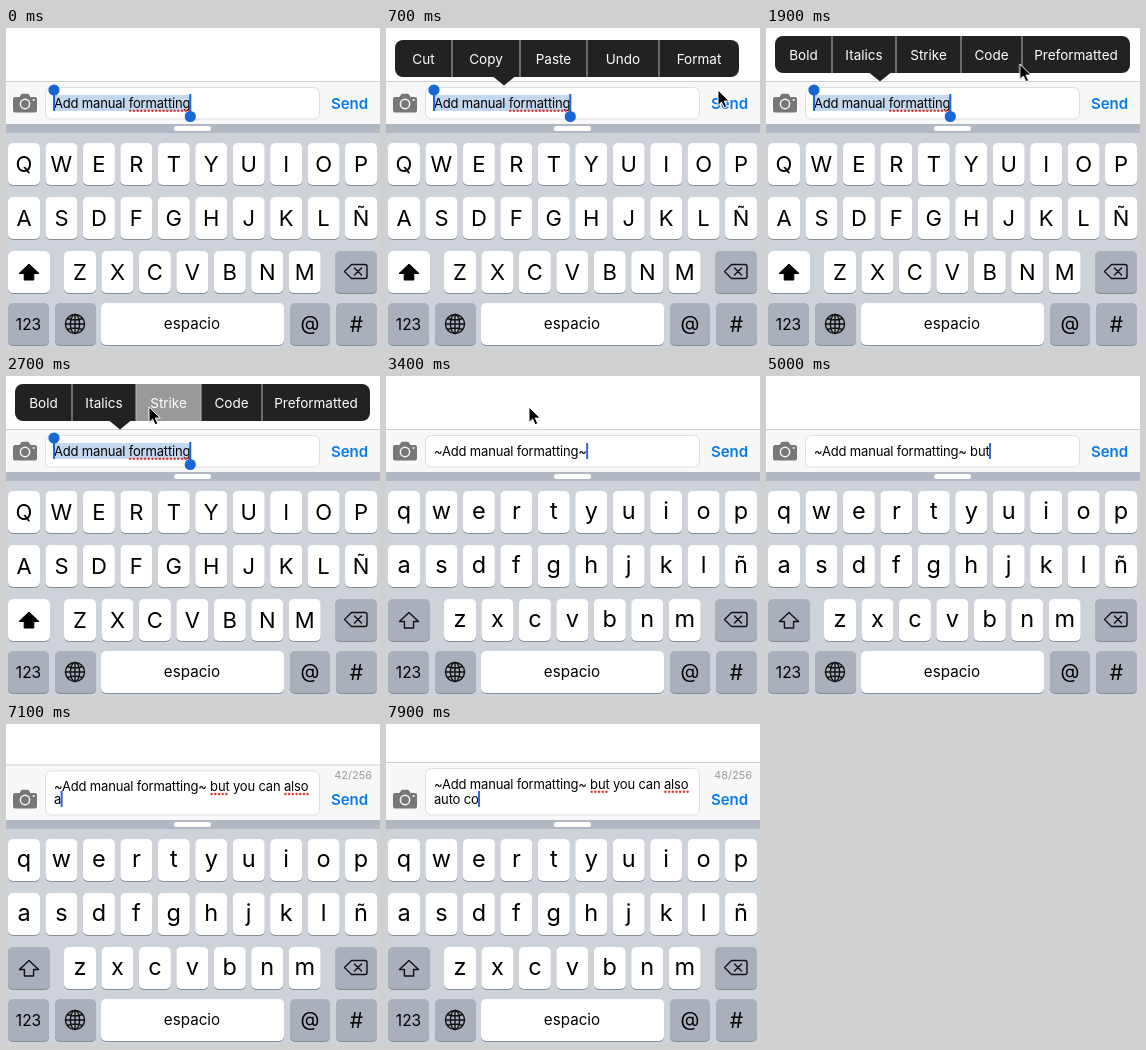
An HTML page for the animation above (8000 ms loop, 374 by 320 pixels).

```html
<!DOCTYPE html>
<html lang="en">
<head>
<meta charset="utf-8">
<title>Message formatting</title>
<style>
  html, body { margin: 0; width: 100%; height: 100%; overflow: hidden; background: #fff; }
  svg { display: block; width: 374px; height: 320px; font-family: Inter, Roboto, sans-serif; }
  text { white-space: pre; }
  .mid { text-anchor: middle; }
  .msg { font-size: 13px; letter-spacing: -.18px; }
  .upper { font-size: 22px; }
  .lower { font-size: 23.5px; }
  .label { font-size: 13.5px; fill: #fff; text-anchor: middle; }
  .typo { stroke: #e03a34; stroke-width: 2.5; stroke-linecap: round; stroke-dasharray: 0 3.7; }
  .line { fill: none; stroke: #111; stroke-width: 1.4; stroke-linejoin: round; stroke-linecap: round; }

  .before, .after, .menu, .press { animation: 8s step-end infinite; }
  .before { animation-name: before; }
  .after { animation-name: after; }
  #menu1 { animation-name: menu1; }
  #menu2 { animation-name: menu2; }
  #menu1 .press { animation-name: press1; }
  #menu2 .press { animation-name: press2; }
  #mouse { animation: show 8s step-end infinite, move 8s ease-in-out infinite; }

  @keyframes before { 0% { visibility: visible } 36.25%, 100% { visibility: hidden } }
  @keyframes after { 0% { visibility: hidden } 36.25%, 100% { visibility: visible } }
  @keyframes menu1 { 0% { visibility: hidden } 3.75% { visibility: visible } 18.75%, 100% { visibility: hidden } }
  @keyframes menu2 { 0% { visibility: hidden } 18.75% { visibility: visible } 36.25%, 100% { visibility: hidden } }
  @keyframes press1 { 0% { opacity: 0 } 16.9% { opacity: 1 } 18.75%, 100% { opacity: 0 } }
  @keyframes press2 { 0% { opacity: 0 } 31.25% { opacity: 1 } 36.25%, 100% { opacity: 0 } }
  @keyframes show { 0% { visibility: hidden } 8.75% { visibility: visible } 46.9%, 100% { visibility: hidden } }
  @keyframes move {
    0%, 8.75% { transform: translate(332px, 62px) }
    13.75%, 20% { transform: translate(300px, 38px) }
    30%, 100% { transform: translate(143px, 31px) }
  }
</style>
</head>
<body>
<svg id="stage" viewBox="0 0 374 320">
  <rect width="374" height="320" fill="#fff"/>

  <g id="bar">
    <rect id="barBack" width="374" fill="#f8f8f9"/>
    <rect id="barEdge" width="374" height="1" fill="#cfcfd2"/>
    <rect id="field" x="39.5" width="274" rx="6" fill="#fff" stroke="#dedee0"/>
    <g fill="#77777a">
      <path d="M9 69h4.5l1.6-2.6q.4-.6 1.1-.6h5.6q.7 0 1.1.6l1.6 2.6H29q2 0 2 2v11.5q0 2-2 2H9q-2 0-2-2V71q0-2 2-2z"/>
      <circle cx="19" cy="76" r="5.4" fill="#f8f8f9"/>
      <circle cx="19" cy="76" r="3.9"/>
      <circle cx="27.6" cy="72" r="1" fill="#f8f8f9"/>
    </g>
    <text x="343.5" y="80.5" class="mid" font-size="15" font-weight="600" fill="#087ae8">Send</text>
    <text id="count" x="366" y="54.5" font-size="11" text-anchor="end" fill="#9b9ba0"></text>
  </g>

  <g class="before">
    <rect id="mark" x="48" y="67" height="16" fill="#c3d8ee"/>
    <text id="chosen" class="msg" x="48" y="80">Add manual formatting</text>
    <path id="chosenTypo" class="typo"/>
    <g fill="#1768d6">
      <rect x="47" y="62" width="2" height="21"/>
      <circle cx="48" cy="62" r="5.6"/>
      <g id="endGrip">
        <rect x="-1" y="66" width="2" height="22"/>
        <circle cy="88.5" r="5.6"/>
      </g>
    </g>
  </g>

  <g class="after">
    <text id="line1" class="msg" x="48"></text>
    <text id="line2" class="msg" x="48" y="80"></text>
    <path id="typos" class="typo"/>
    <rect id="caret" y="67" width="2" height="16" fill="#3565d8"/>
  </g>

  <rect y="96" width="374" height="224" fill="#ced2d9"/>
  <rect y="96" width="374" height="9" fill="#b2b8c3"/>
  <rect x="168" y="98" width="37" height="5" rx="2.5" fill="#fff"/>
  <g id="keys"></g>

  <g class="before">
    <rect x="2" y="223" width="42" height="42" rx="5" fill="#fff"/>
    <path d="M23 236l10 9.5h-5.2v6.5h-9.6v-6.5H13z" stroke="#000" stroke-linejoin="round"/>
  </g>
  <path class="line after" d="M23 236.5l9.6 9h-5v6.5h-9.2v-6.5h-5z"/>
  <path class="line" d="M345.5 236.5H359q2 0 2 2v10q0 2-2 2h-13.5l-7-7zM348.5 240l7 7m0-7l-7 7"/>
  <g class="line" stroke-width="1.2">
    <circle cx="69" cy="296" r="9.5"/>
    <ellipse cx="69" cy="296" rx="4.6" ry="9.5"/>
    <path d="M69 286.5v19M59.5 296h19M61.5 290.5q7.5 3 15 0M61.5 301.5q7.5-3 15 0"/>
  </g>

  <g id="menu1" class="menu"></g>
  <g id="menu2" class="menu"></g>
  <path id="mouse" d="M0 0v15.5l3.6-3.4 2.5 5.7 2.7-1.2-2.5-5.5h5z" fill="#000" stroke="#fff" stroke-width="1"/>
</svg>

<script>
const $ = id => document.getElementById(id);
const set = (node, attrs) => {
  for (const k in attrs) node.setAttribute(k, attrs[k]);
  return node;
};
const add = (parent, tag, attrs, text = '') => {
  const node = set(document.createElementNS('http://www.w3.org/2000/svg', tag), attrs);
  node.textContent = text;
  return parent.appendChild(node);
};

// Keyboard
const GREY = '#a9afbb';
function key(x, y, width, fill = '#fff') {
  add($('keys'), 'rect', { x, y: y + 1, width, height: 42, rx: 5, fill: '#898d94' });
  add($('keys'), 'rect', { x, y, width, height: 42, rx: 5, fill });
}
function keyText(x, y, text, size) {
  add($('keys'), 'text', { x, y, class: 'mid', 'font-size': size }, text);
}
[['qwertyuiop', 18, 115], ['asdfghjklñ', 18, 169], ['zxcvbnm', 74, 223]].forEach(([row, x0, y]) => {
  [...row].forEach((c, i) => {
    const x = x0 + i * 37.45;
    key(x - 16, y, 32);
    add($('keys'), 'text', { x, y: y + 29, class: 'mid upper before' }, c.toUpperCase());
    add($('keys'), 'text', { x, y: y + 27.5, class: 'mid lower after' }, c);
  });
});
key(2, 223, 42, GREY);
key(329, 223, 42, GREY);
key(2, 275, 41, GREY);
key(49, 275, 41, GREY);
key(95, 275, 183);
key(284, 275, 40, GREY);
key(330, 275, 41, GREY);
keyText(22.5, 301.5, '123', 15.5);
keyText(186, 300.5, 'espacio', 15.2);
keyText(304, 302, '@', 19.5);
keyText(350.5, 303.5, '#', 21);

// Popup menus
function menu(id, y, right, cuts, labels, pressed, tip) {
  const g = $(id), edges = [9, ...cuts, right];
  add(g, 'rect', { x: 9, y, width: right - 9, height: 37, rx: 8, fill: '#222' });
  add(g, 'path', { d: `M${tip - 11} ${y + 36.5}h22l-11 9z`, fill: '#222' });
  const left = edges[pressed], end = edges[pressed + 1], r = end === right ? 8 : 0;
  add(g, 'path', {
    class: 'press', fill: '#999',
    d: `M${left} ${y}H${end - r}q${r} 0 ${r} ${r}v${37 - 2 * r}q0 ${r} ${-r} ${r}H${left}z`
  });
  cuts.forEach(x => add(g, 'rect', { x: x - .5, y, width: 1, height: 37, fill: '#b5b5b5' }));
  labels.forEach((s, i) =>
    add(g, 'text', { x: (edges[i] + edges[i + 1]) / 2, y: y + 23.5, class: 'label' }, s));
}
menu('menu1', 12, 353, [66, 134, 201, 273], ['Cut', 'Copy', 'Paste', 'Undo', 'Format'], 4, 118);
menu('menu2', 8, 364, [66, 130, 195, 256], ['Bold', 'Italics', 'Strike', 'Code', 'Preformatted'], 2, 114);

// Path of a misspelling mark under one word of a text node
function underline(node, word, y) {
  const at = node.textContent.indexOf(word);
  if (at < 0) return '';
  const x = 48 + (at ? node.getSubStringLength(0, at) : 0);
  return `M${x + 1.5} ${y}h${node.getSubStringLength(at, word.length) - 2}`;
}
const chosenWidth = $('chosen').getComputedTextLength();
set($('mark'), { width: chosenWidth });
set($('endGrip'), { transform: `translate(${48 + chosenWidth})` });
set($('chosenTypo'), { d: underline($('chosen'), 'formatting', 82.7) });

// Typing
const MESSAGE = '~Add manual formatting~ but you can also auto co';
const WRAP = 41, WRAP_TIME = 7000, GROW = 15;
const PACE = [[4350, 23], [4950, 27], [6200, 36], [7800, 48]];

function typed(t) {
  if (t <= PACE[0][0]) return PACE[0][1];
  for (let i = 1; i < PACE.length; i++) {
    const [t0, n0] = PACE[i - 1], [t1, n1] = PACE[i];
    if (t < t1) return Math.floor(n0 + (n1 - n0) * (t - t0) / (t1 - t0) + 1e-6);
  }
  return MESSAGE.length;
}

function draw(t) {
  const n = typed(t), wrapped = n > WRAP;
  const grow = GROW * Math.min(1, Math.max(0, (t - WRAP_TIME) / 120));
  const top = 54 - grow, one = $('line1'), two = $('line2');

  set($('barBack'), { y: top, height: 96 - top });
  set($('barEdge'), { y: top - 1 });
  set($('field'), { y: top + 5.5, height: 85.5 - top });
  $('count').textContent = wrapped ? n + '/256' : '';

  one.textContent = MESSAGE.slice(0, Math.min(n, WRAP));
  two.textContent = MESSAGE.slice(WRAP, Math.max(n, WRAP));
  set(one, { y: 80 - grow });
  const marks = ['but', 'also'].filter(w => one.textContent.includes(w + ' '));
  set($('typos'), { d: marks.map(w => underline(one, w, 82.7 - grow)).join('') });
  set($('caret'), { x: 47.5 + (wrapped ? two : one).getComputedTextLength() });
}

const start = performance.now();
function tick() {
  draw((performance.now() - start) % 8000);
  requestAnimationFrame(tick);
}
tick();
</script>
</body>
</html>
```
